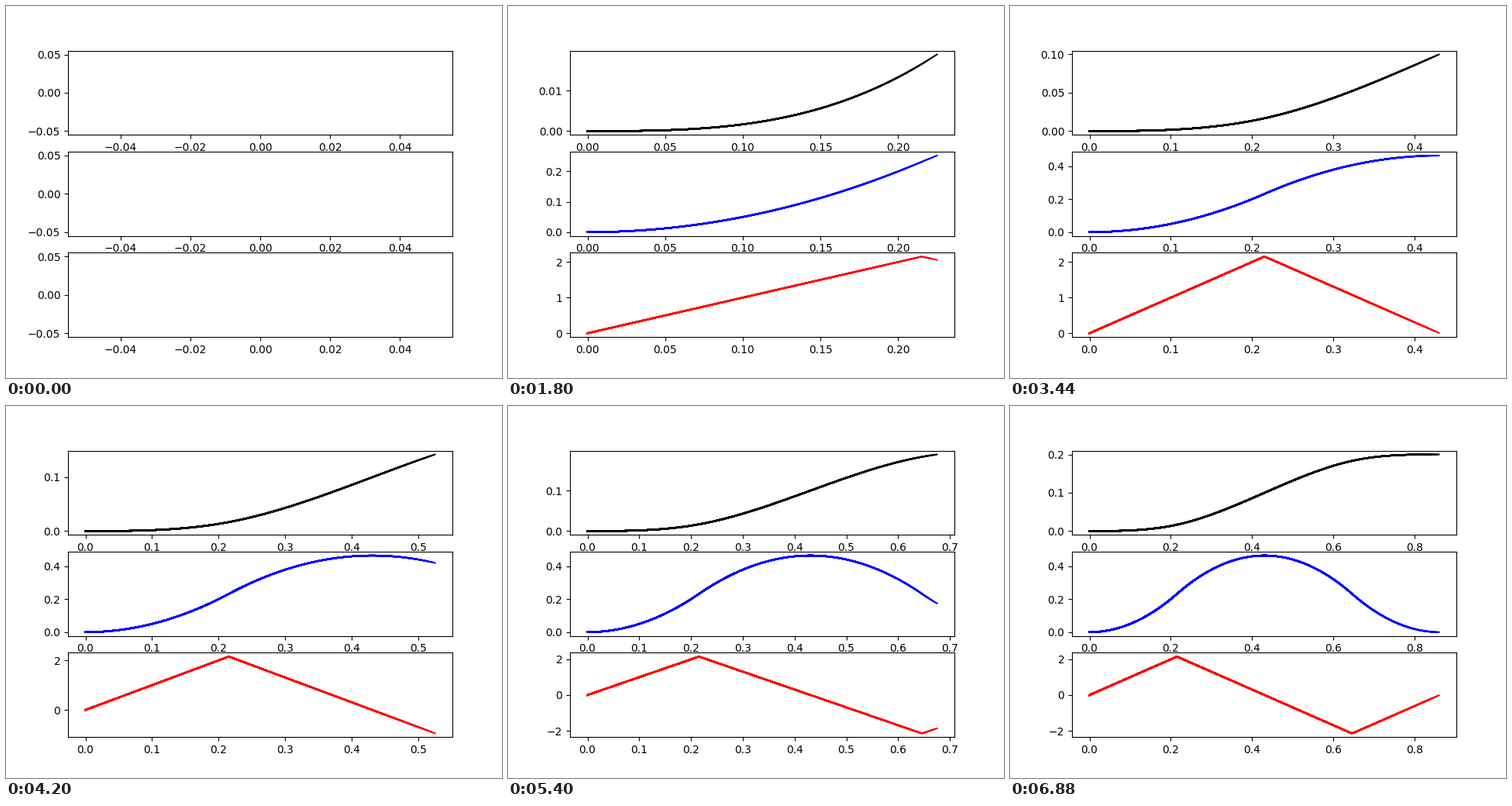
A matplotlib script for the animation above (6.92 s loop, 640 by 480 pixels).

```python
import numpy as np
import matplotlib.pyplot as plt
from matplotlib.animation import FuncAnimation
from matplotlib.collections import LineCollection

JERK = 10.0
DISTANCE = 0.2
DT = 0.005
FRAMES = 173
INTERVAL = 40

# The move has four phases of constant jerk: +, -, -, +
T = (DISTANCE / (2 * JERK)) ** (1 / 3)
t = np.arange(FRAMES) * DT


def ramp(order):
    """Integrate the jerk profile `order` times in closed form."""
    steps = [(0, 1), (T, -2), (3 * T, 2)]
    fact = np.prod(np.arange(1, order + 1))
    return sum(k * JERK * np.maximum(t - t0, 0) ** order / fact
               for t0, k in steps)


def padded(values):
    lo, hi = values.min(), values.max()
    if lo == hi:
        lo, hi = -0.05, 0.05
    pad = 0.05 * (hi - lo)
    return lo - pad, hi + pad


fig, axes = plt.subplots(3, 1, figsize=(6.4, 4.8), dpi=100)
plots = []
for ax, order, color in zip(axes, (3, 2, 1), "kbr"):
    y = ramp(order)
    points = np.column_stack([t, y])
    # Every step draws the whole curve so far on top of the earlier ones
    traces = [points[:n] for n in range(2, FRAMES + 1)]
    lines = LineCollection([], colors=color, linewidths=1.5,
                           capstyle="projecting", joinstyle="round")
    ax.add_collection(lines, autolim=False)
    plots.append((ax, lines, y, traces))


def update(i):
    for ax, lines, y, traces in plots:
        lines.set_segments(traces[:i])
        ax.set_xlim(*padded(t[:i + 1]))
        ax.set_ylim(*padded(y[:i + 1]))
    return [p[1] for p in plots]


anim = FuncAnimation(fig, update, frames=FRAMES, init_func=lambda: update(0),
                     interval=INTERVAL, repeat=True, repeat_delay=0)
plt.show()
```
